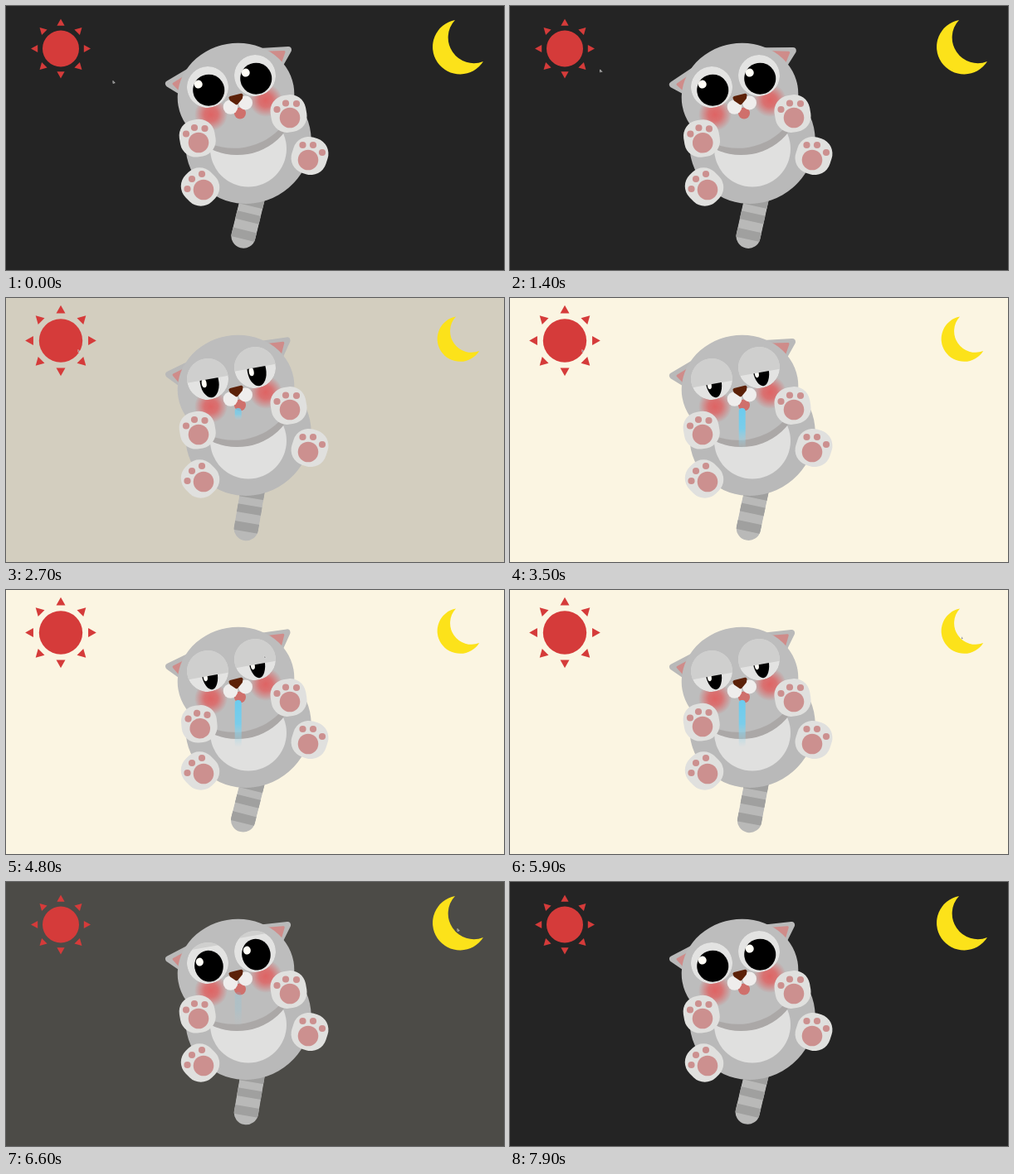
Animation, 600 px wide and 319 px high, one loop 8 s. Source, as an HTML page:

```html
<!DOCTYPE html>
<html lang="en">
<head>
<meta charset="utf-8">
<title>Sleepy cat</title>
<style>
  html, body { margin: 0; width: 100%; height: 100%; overflow: hidden; background: #242424; }
  svg { display: block; width: 100%; height: 100%; }
</style>
</head>
<body>
<svg id="stage" viewBox="0 0 600 319"></svg>
<script>
const LOOP = 8000, DAY = 2000, NIGHT = 5900;
const NIGHT_SKY = [36, 36, 36], DAY_SKY = [251, 245, 226];
const stage = document.getElementById('stage');

const circle = (x, y, r, fill) => `<circle cx="${x}" cy="${y}" r="${r}" fill="${fill}"/>`;

const rays = [0, 45, 90, 135, 180, 225, 270, 315]
  .map(a => `<path d="M0-36l4.6 8.2h-9.2z" transform="rotate(${a})"/>`).join('');

const eye = (x, y) => `
  <g transform="translate(${x} ${y}) rotate(-10)" clip-path="url(#eyeClip)">
    ${circle(0, 0, 25, '#e3e3e2')}
    <g class="pupil">
      ${circle(0, 0, 19, '#000')}
      <circle class="glint" cx="-11.1" r="5" fill="#fffdf6"/>
    </g>
    <rect class="lid" x="-26" y="-26" width="52" height="0" fill="#cfcfce"/>
  </g>`;

const paw = (id, x, y, tilt, pad, toes) => `
  <g id="${id}">
    <rect x="${x - 21.5}" y="${y - 22.5}" width="43" height="45" rx="19"
      transform="rotate(${tilt} ${x} ${y})" fill="#e0e0de"/>
    ${circle(...pad, 12.3, '#cc908f')}
    ${toes.map(p => circle(...p, 4.1, '#cc908f')).join('')}
  </g>`;

const ear = (id, outer, inner) => `
  <g id="${id}" stroke-linejoin="round">
    <path d="${outer}" fill="#b9b9b9" stroke="#b9b9b9" stroke-width="8"/>
    <path d="${inner}" fill="#cf8c8a" stroke="#cf8c8a" stroke-width="3"/>
  </g>`;

const body = '<ellipse cx="292" cy="165" rx="76.5" ry="73" transform="rotate(-30 292 165)" fill="#b9b9b9"/>';

stage.innerHTML = `
  <defs>
    <clipPath id="eyeClip"><circle r="25"/></clipPath>
    <clipPath id="bodyClip">${body}</clipPath>
    <clipPath id="tailClip"><rect x="-14.7" y="-20" width="29.4" height="83" rx="14.7"/></clipPath>
    <radialGradient id="blush">
      <stop offset="0" stop-color="#de6464"/>
      <stop offset=".4" stop-color="#de6464" stop-opacity=".85"/>
      <stop offset="1" stop-color="#de6464" stop-opacity="0"/>
    </radialGradient>
    <linearGradient id="water" x1="0" y1="0" x2="0" y2="1">
      <stop offset="0" stop-color="#6ccbee"/>
      <stop offset=".5" stop-color="#7acdea"/>
      <stop offset="1" stop-color="#a5d8e8" stop-opacity="0"/>
    </linearGradient>
  </defs>
  <rect id="sky" width="600" height="319"/>
  <g id="sun" fill="#d53b3a"><circle r="22"/>${rays}</g>
  <path id="moon" fill="#fce21a" d="M-6-32.5A33 33 0 1 0 28 17.5A31 31 0 0 1-6-32.5z"/>

  <g id="tail"><g clip-path="url(#tailClip)">
    <path d="M-15-20h30v84h-30z" fill="#b9b9b8"/>
    <path d="M-15 1h30v10h-30zM-15 20h30v10h-30zM-15 41h30v11h-30z" fill="#a0a09f"/>
  </g></g>

  ${body}
  ${circle(292, 172.5, 46, '#e0e0df')}
  <g clip-path="url(#bodyClip)">
    <ellipse cx="280" cy="115" rx="69" ry="65" transform="rotate(-10 280 115)" fill="#aba8a7"/>
  </g>

  ${ear('earL', 'M228 75L196 94L214 105z', 'M220 83L202 94L212 104z')}
  ${ear('earR', 'M306 55L340 53L326 78z', 'M316 56L335 55.5L330 70z')}
  <ellipse cx="277" cy="108.3" rx="70.5" ry="63.3" transform="rotate(-10 277 108.3)" fill="#bdbdbd"/>

  ${circle(247, 131, 20, 'url(#blush)')}
  ${circle(313, 114, 20, 'url(#blush)')}
  ${eye(243, 98)}
  ${eye(300, 84)}
  ${circle(282, 129.5, 7, '#cf706c')}
  <rect id="drool" x="275.7" y="133" width="8" rx="4" fill="url(#water)"/>
  ${circle(270.5, 122, 8.8, '#efedec')}
  ${circle(288.5, 117, 8.5, '#efedec')}
  <path d="M270.5 111L283.5 107.8L283 111L277.8 117.3L271.5 113z" fill="#5c2108" stroke="#5c2108"
    stroke-width="4" stroke-linejoin="round"/>

  ${paw('pawL', 230.7, 159.7, -10, [232, 165], [[217, 154.5], [227, 147], [239.5, 148]])}
  ${paw('pawR', 340.5, 130, -10, [342, 135], [[326.5, 125], [337, 117.5], [350, 118]])}
  ${paw('footL', 234, 218.5, -45, [238, 222], [[218.5, 221], [224, 209], [236, 203]])}
  ${paw('footR', 366, 181, 18, [364, 186], [[357.5, 168], [370, 168], [381, 177]])}

  <path id="cursor" d="M0-1.5v3l1-.7 1.2.2z" fill="#111" stroke="#eee" stroke-width=".7"/>`;

const $ = id => document.getElementById(id);
const [pupils, glints, lids] = ['.pupil', '.glint', '.lid'].map(s => stage.querySelectorAll(s));
const set = (id, name, value) => $(id).setAttribute(name, value);
const setAll = (list, name, value) => list.forEach(e => e.setAttribute(name, value));
const clamp = v => Math.min(1, Math.max(0, v));
const lerp = (a, b, k) => a + (b - a) * k;

// cubic-bezier(.42, 0, .58, 1), solved by bisection
function easeInOut(x) {
  let lo = 0, hi = 1;
  for (let i = 0; i < 24; i++) {
    const m = (lo + hi) / 2, n = 1 - m;
    if (1.26 * n * n * m + 1.74 * n * m * m + m * m * m < x) lo = m; else hi = m;
  }
  const s = (lo + hi) / 2;
  return s * s * (3 - 2 * s);
}

// 0 at night, 1 by day, with a transition of the given length each way
const daylight = (t, ms) =>
  easeInOut(clamp((t - DAY) / ms)) - easeInOut(clamp((t - NIGHT) / ms));

const bump = (t, start, ms) => Math.sin(Math.PI * clamp((t - start) / ms)) ** 2;

const route = [[0, 129, 92], [1000, 126, 90], [1900, 87, 64], [3800, 87, 64],
  [4800, 311, 81], [5700, 544, 58], [7200, 544, 58]];

function cursorAt(t) {
  const i = route.findIndex(k => k[0] > t);
  if (i < 0) return null;
  const [a, b] = [route[i - 1], route[i]];
  const k = (t - a[0]) / (b[0] - a[0]);
  return [lerp(a[1], b[1], k), lerp(a[2], b[2], k)];
}

function draw(t) {
  const day = daylight(t, 1000), grow = daylight(t, 600), wet = daylight(t, 2000);
  const phase = t % 4000;

  set('sky', 'fill', `rgb(${NIGHT_SKY.map((c, i) => Math.round(lerp(c, DAY_SKY[i], day)))})`);
  set('sun', 'transform', `translate(66 51.5) scale(${lerp(1, 1.19, grow)})`);
  set('moon', 'transform', `translate(547 49.5) scale(${lerp(1, 0.83, grow)})`);

  const sway = Math.cos((t - 2500) / 4000 * 2 * Math.PI);
  set('tail', 'transform', `translate(297.5 231) rotate(${12 - 2.4 * sway})`);

  const twitch = 5 * Math.sin(t / 1000 * 2 * Math.PI);
  set('earL', 'transform', `rotate(${-twitch} 215 95)`);
  set('earR', 'transform', `rotate(${twitch} 320 70)`);

  set('pawL', 'transform', `rotate(${6.5 * bump(phase, 500, 1000)} 203 189)`);
  set('pawR', 'transform', `rotate(${8 * bump(phase, 0, 800)} 341 180)`);

  setAll(pupils, 'transform',
    `translate(${lerp(0.6, 1.6, day)} 3.8) scale(${lerp(1, 0.5, day)} 1)`);
  setAll(glints, 'cy', lerp(-9.1, 2.9, day));
  setAll(lids, 'height', 1 + 31 * day);

  set('drool', 'height', 57 * wet);
  set('drool', 'opacity', day);

  const at = cursorAt(t);
  set('cursor', 'opacity', at ? 1 : 0);
  if (at) set('cursor', 'transform', `translate(${at})`);
}

const began = performance.now();
function tick() {
  draw((performance.now() - began) % LOOP);
  requestAnimationFrame(tick);
}
tick();
</script>
</body>
</html>
```
